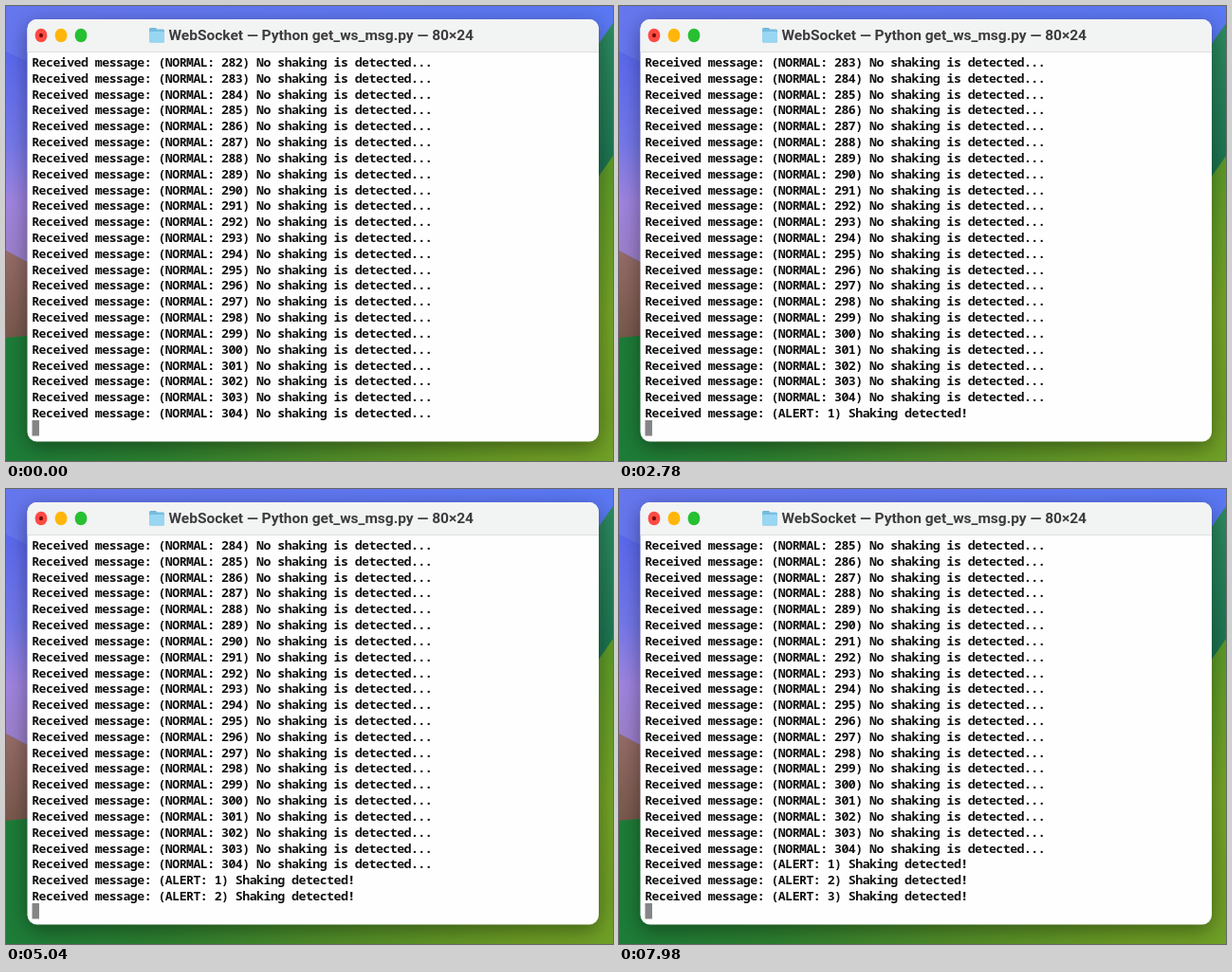
These frames come from a looping animation (640 px wide and 480 px high, 8000 ms). An HTML page with a canvas:

```html
<!DOCTYPE html>
<html lang="en">
<head>
<meta charset="utf-8">
<title>WebSocket terminal</title>
<style>
  html, body { margin: 0; width: 100%; height: 100%; overflow: hidden; }
  canvas { display: block; width: 640px; height: 480px; }
</style>
</head>
<body>
<canvas id="stage" width="640" height="480"></canvas>
<script>
const LOOP = 8000;
const ALERT_TIMES = [1660, 4180, 6700];
const ROWS = 23;
const LAST_NORMAL = 304;
const ROW_HEIGHT = 16.82;
const WINDOW = [22.5, 14, 602.5, 445.5];

const ctx = document.getElementById('stage').getContext('2d');

function gradient(x0, y0, x1, y1, stops) {
  const fill = ctx.createLinearGradient(x0, y0, x1, y1);
  for (const [offset, color] of stops) fill.addColorStop(offset, color);
  return fill;
}

function polygon(points, fill) {
  ctx.beginPath();
  points.forEach(([x, y]) => ctx.lineTo(x, y));
  ctx.closePath();
  ctx.fillStyle = fill;
  ctx.fill();
}

function rect(x, y, w, h, fill) {
  ctx.fillStyle = fill;
  ctx.fillRect(x, y, w, h);
}

function roundRect(x, y, w, h, radius, fill) {
  ctx.beginPath();
  ctx.roundRect(x, y, w, h, radius);
  ctx.fillStyle = fill;
  ctx.fill();
}

function ellipse(x, y, rx, ry, fill) {
  ctx.beginPath();
  ctx.ellipse(x, y, rx, ry, 0, 0, Math.PI * 2);
  ctx.fillStyle = fill;
  ctx.fill();
}

function drawWallpaper() {
  rect(0, 0, 640, 480, gradient(0, 0, 640, 0, [[0, '#6676ee'], [1, '#5a78f4']]));

  // Hills along the left edge
  polygon([[0, 48], [60, 76], [60, 290], [0, 258]], gradient(0, 48, 0, 260,
    [[0, '#5a68ee'], [0.45, '#7478ea'], [0.75, '#a084e0'], [1, '#9c80cc']]));
  polygon([[0, 258], [60, 290], [60, 350], [0, 350]],
    gradient(0, 258, 0, 350, [[0, '#966c68'], [1, '#78584c']]));

  // Slopes along the right edge
  polygon([[640, 18], [600, 76], [600, 230], [640, 160]],
    gradient(0, 20, 0, 170, [[0, '#2c8a60'], [1, '#1c7450']]));
  polygon([[640, 158], [600, 216], [600, 480], [640, 480]],
    gradient(0, 160, 0, 480, [[0, '#5c9a28'], [0.5, '#74a426'], [1, '#6c9c24']]));

  // Meadow
  polygon([[0, 350], [60, 344], [600, 420], [640, 440], [640, 480], [0, 480]],
    gradient(0, 0, 640, 0,
      [[0, '#1c7c38'], [0.25, '#2c8030'], [0.55, '#528e28'], [0.85, '#6c9c24'], [1, '#70a026']]));
}

function drawWindow() {
  ctx.save();
  ctx.shadowColor = 'rgba(0, 0, 0, 0.4)';
  ctx.shadowBlur = 22;
  ctx.shadowOffsetY = 6;
  roundRect(...WINDOW, 10, '#fefefe');
  ctx.restore();

  const [x, y, w] = WINDOW;
  roundRect(x, y, w, 34, [10, 10, 0, 0], '#f2f3f3');
  rect(x, 48, w, 1, '#dededf');

  ['#ff4a44', '#ffb60a', '#26c032'].forEach((color, i) =>
    ellipse(37 + i * 21, 31, 6.4, 7.3, color));
  ellipse(37, 31, 2, 2.3, '#700c04');

  // Folder icon
  roundRect(151, 23, 8, 5, 1.5, '#70b8dc');
  roundRect(151, 24.5, 16, 14, 1.5, '#76bee0');
  roundRect(151, 27, 16, 11.5, 1.5, '#98d6f2');

  ctx.font = 'bold 15.5px Roboto, sans-serif';
  ctx.letterSpacing = '0px';
  ctx.fillStyle = '#3c3c3e';
  ctx.fillText('WebSocket — Python get_ws_msg.py — 80×24', 171.5, 36.3);
}

function message(number) {
  return 'Received message: ' + (number <= LAST_NORMAL
    ? `(NORMAL: ${number}) No shaking is detected...`
    : `(ALERT: ${number - LAST_NORMAL}) Shaking detected!`);
}

function drawLog(alerts) {
  ctx.font = '600 13.2px "Noto Sans Mono", monospace';
  ctx.letterSpacing = '-0.51px';
  ctx.fillStyle = '#101012';
  const first = LAST_NORMAL - ROWS + 1 + alerts;
  for (let row = 0; row < ROWS; row++) {
    ctx.fillText(message(first + row), 27.2, 64 + row * ROW_HEIGHT);
  }
  rect(27.5, 437, 7.5, 16.5, '#858587');
}

function draw(now) {
  const time = now % LOOP;
  drawWallpaper();
  drawWindow();
  drawLog(ALERT_TIMES.filter(t => time >= t).length);
  requestAnimationFrame(draw);
}

requestAnimationFrame(draw);
</script>
</body>
</html>
```
